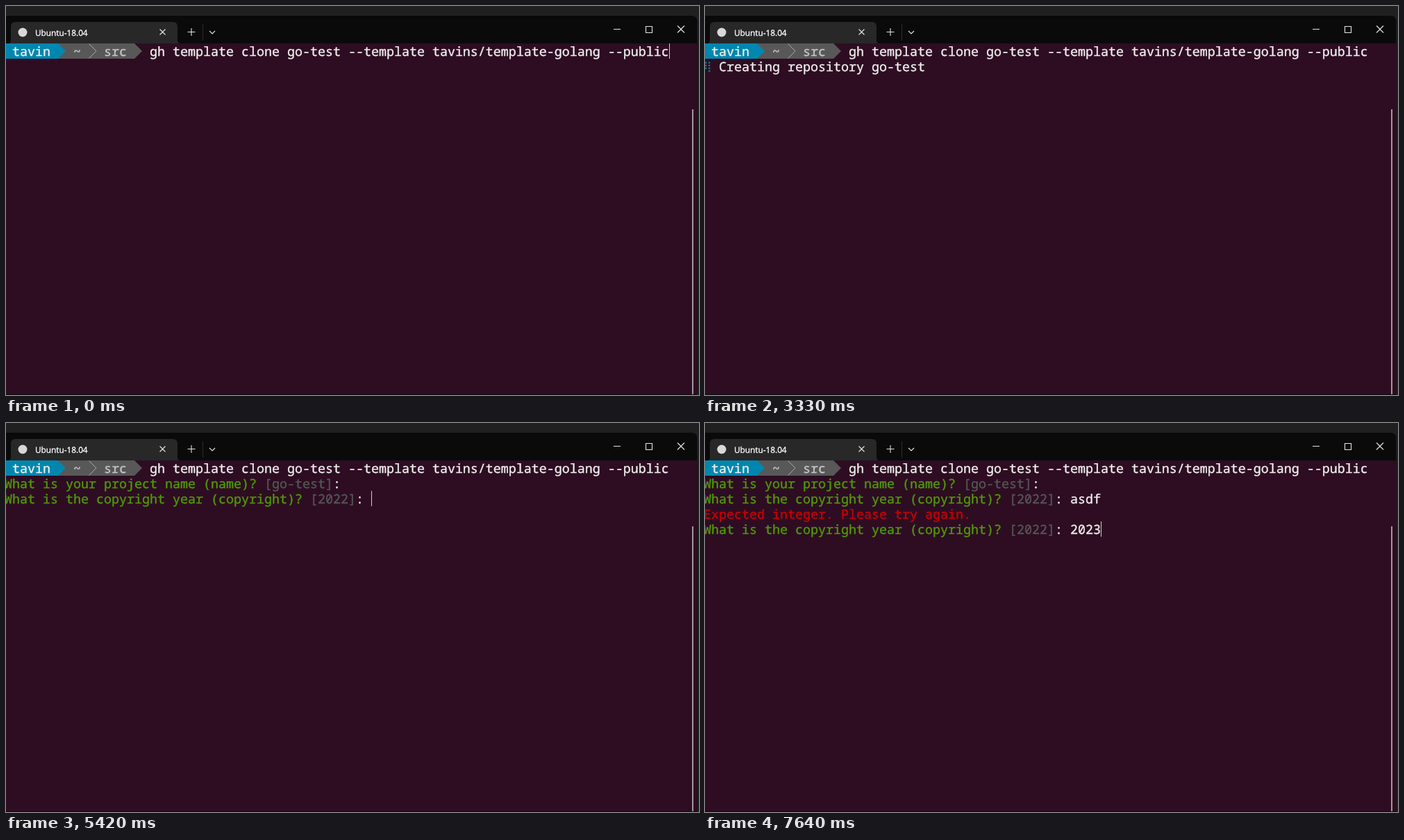
Animation, 998 px wide and 561 px high, one loop 8 s. Source, as an HTML page:

```html
<!DOCTYPE html>
<html lang="en">
<head>
<meta charset="utf-8">
<title>Terminal</title>
<style>
  html, body { margin: 0; width: 100%; height: 100%; overflow: hidden; background: #202020; }
  svg { display: block; width: 998px; height: 561px; }
  text { white-space: pre; text-rendering: geometricPrecision; }
  .term { font: 500 18.333px "Noto Sans Mono", "DejaVu Sans Mono", monospace; stroke-width: .4px; }
  .tab { font: 11.8px "Open Sans", "Noto Sans", sans-serif; fill: #fff; stroke: #fff; stroke-width: .35px; }
  .icon { fill: none; stroke: #e4e4e4; stroke-width: 1.1; }
</style>
</head>
<body>
<svg viewBox="0 0 998 561" xmlns="http://www.w3.org/2000/svg">
  <rect width="998" height="561" fill="#202020"/>
  <path d="M0 14H987Q995.5 14 995.5 22V561H0Z" fill="#0a0a0a"/>
  <path d="M3 54Q7 54 7 49V30Q7 23 14 23H240Q247 23 247 30V49Q247 54 251 54Z" fill="#282828"/>
  <circle cx="24" cy="38" r="6.5" fill="#d8d8d8"/>
  <text class="tab" x="42" y="43">Ubuntu-18.04</text>
  <g class="icon">
    <path d="M221.5 33.5l8 8m0-8l-8 8M261.5 37.5h11m-5.5-5.5v11M293 36l4 4 4-4"/>
    <path d="M283.5 26v24" stroke="#2a2a2a"/>
    <path d="M875 33.5h10M921.5 29.500h9v9h-9zM967 28.500l10 10m0-10l-10 10"/>
  </g>
  <rect y="54" width="995.5" height="506" fill="#2e0d23"/>
  <rect x="988" y="149" width="2" height="411" fill="#9f9a9d"/>
  <path d="M75 54H185L196 65 185 76H75Z" fill="#585858"/>
  <path d="M0 54H75L86 65 75 76H0Z" fill="#0087af"/>
  <path d="M119.5 54.5L130 65 119.5 75.5" fill="none" stroke="#a8a8a8"/>
  <g class="term" id="screen"></g>
  <g id="spinner" fill="#06879a"></g>
  <rect id="cursor" width="1" height="22" fill="#d0ccce"/>
</svg>
<script>
const NS = "http://www.w3.org/2000/svg";
const LOOP = 8000, CELL = 11, LEFT = -2, TOP = 54, ROW = 22;
const WHITE = "#eeeeec", GREEN = "#4e9a06", DIM = "#555753", RED = "#cc0000", PALE = "#c6c6c6";
const screen = document.getElementById("screen");
const spinner = document.getElementById("spinner");
const cursor = document.getElementById("cursor");

function add(parent, tag, attrs) {
  const el = document.createElementNS(NS, tag);
  for (const key in attrs) el.setAttribute(key, attrs[key]);
  return parent.appendChild(el);
}

function print(col, row, str, color) {
  const el = add(screen, "text", {
    x: LEFT + col * CELL, y: TOP + row * ROW + 17.5, fill: color, stroke: color
  });
  el.textContent = str;
  return el;
}

function show(el, on) { el.style.display = on ? "" : "none"; }

// Text that appears at `from` and goes at `to`
const timed = [];
function during(from, to, ...args) { timed.push({ from, to, el: print(...args) }); }

function ask(from, row, question, preset) {
  const col = question.length + 1;
  during(from, LOOP, 0, row, question, GREEN);
  during(from, LOOP, col, row, preset, DIM);
  during(from, LOOP, col + preset.length, row, ":", WHITE);
}

function typed(row, str, times) {
  [...str].forEach((ch, i) => during(times[i], LOOP, 48 + i, row, ch, WHITE));
}

print(1, 0, "tavin", WHITE);
print(9, 0, "~", PALE);
print(13, 0, "src", PALE);
print(19, 0, "gh template clone go-test --template tavins/template-golang --public", WHITE);

const YEAR = "What is the copyright year (copyright)?";
const FIRST = [6210, 6280, 6350, 6420], SECOND = [7430, 7500, 7570, 7640];
during(1330, 4380, 2, 1, "Creating repository go-test", WHITE);
ask(4460, 1, "What is your project name (name)?", "[go-test]");
ask(5420, 2, YEAR, "[2022]");
typed(2, "asdf", FIRST);
during(6620, LOOP, 0, 3, "Expected integer. Please try again.", RED);
ask(6620, 4, YEAR, "[2022]");
typed(4, "2023", SECOND);

// Dots in the order in which the gap travels: down the left, up the right
const dots = [0, 1, 2, 3, 3, 2, 1, 0].map((y, i) =>
  add(spinner, "circle", { cx: i < 4 ? 1.2 : 6.2, cy: 81.7 + y * 4, r: 1.3 }));

// Spinner bursts: first step, last step, number of steps
const ticks = [
  [1330, 1390, 2], [1530, 1720, 3], [1860, 2440, 7],
  [2580, 3150, 7], [3330, 4010, 8], [4150, 4310, 3]
].flatMap(([a, b, n]) => Array.from({ length: n }, (_, i) => a + (b - a) * i / (n - 1)));

// Cursor: time, column, row
const moves = [
  [0, 87, 0], [1270, -1, 1], [4460, 45, 1], [5420, 48, 2],
  ...FIRST.map((t, i) => [t, 49 + i, 2]),
  [6620, 48, 4],
  ...SECOND.map((t, i) => [t, 49 + i, 4])
];

function draw(t) {
  for (const { from, to, el } of timed) show(el, t >= from && t < to);

  const step = ticks.filter(x => x <= t).length - 1;
  show(spinner, step >= 0 && t < 4380);
  dots.forEach((dot, i) => show(dot, i !== step % 8));

  const [, col, row] = moves.filter(m => m[0] <= t).pop();
  cursor.setAttribute("x", LEFT + col * CELL);
  cursor.setAttribute("y", TOP + row * ROW);
}

const start = performance.now();
function frame() {
  draw((performance.now() - start) % LOOP);
  requestAnimationFrame(frame);
}
frame();
</script>
</body>
</html>
```
